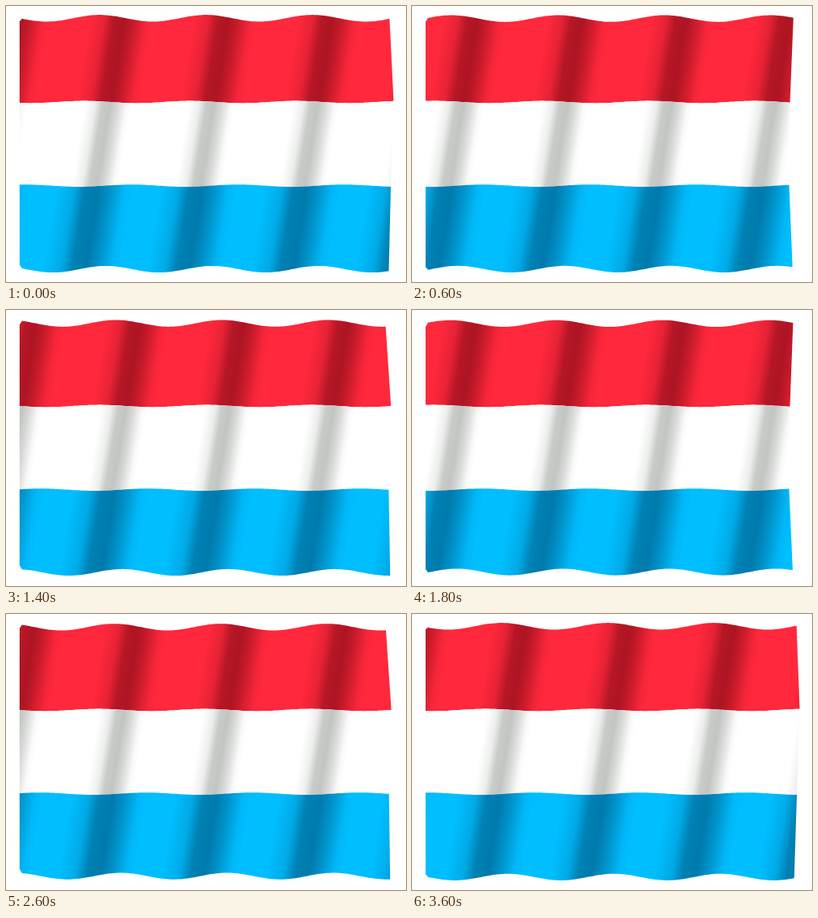
An HTML page with a canvas that plays this animation: 500x345 px, repeating every 3700 ms.

```html
<!DOCTYPE html>
<html lang="en">
<head>
<meta charset="utf-8">
<title>Waving flag</title>
<style>
html, body { margin: 0; width: 100%; height: 100%; overflow: hidden; background: #fff; }
canvas { display: block; }
</style>
</head>
<body>
<canvas id="flag" width="500" height="345"></canvas>
<script>
const ctx = document.getElementById('flag').getContext('2d');
const LOOP = 3700, STEP = 100, TURN = 2 * Math.PI;
const PHASE_STEP = 2.96 / 36;
const LEFT = 17, WAVE = 133, FOLD = 130, SLANT = 0.16;

// Horizontal seams: mean height, amplitude, crest position, and the
// right end as mean + a cos + b sin of the phase.
const seams = [
  { y: 15.3, amp: 4.2, crest: 250, end: [478.2, 1.2, -5.3] },
  { y: 120, amp: 1.4, crest: 230, end: [478.5, 6, -1] },
  { y: 224.6, amp: 1.4, crest: 290, end: [476.2, 4.8, -0.8] },
  { y: 329, amp: 4.1, crest: 258, end: [477, 1.5, 2.9] }
];

const stripes = [
  { light: [255, 40, 60], dark: [174, 21, 35], reach: 39 },
  { light: [254, 255, 254], dark: [194, 197, 194], reach: 29 },
  { light: [0, 190, 255], dark: [0, 122, 172], reach: 47 }
];

// Shadow depth across one fold, from its left rim to its right rim.
const profile = [[-1, 0], [-0.55, 0.3], [-0.25, 0.9], [0.1, 1], [0.4, 0.68], [0.8, 0.1], [1, 0]];

const mix = (a, b, k) => `rgb(${a.map((v, i) => Math.round(v + (b[i] - v) * k))})`;

function seamY(seam, x, phase, shift) {
  return seam.y + shift - seam.amp * Math.cos(TURN * ((x - seam.crest) / WAVE - phase));
}

function endX([mean, a, b], phase) {
  return mean + a * Math.cos(TURN * phase) + b * Math.sin(TURN * phase);
}

function seamPoints(seam, phase, shift) {
  const end = endX(seam.end, phase), points = [];
  for (let x = LEFT; x < end; x += 3) points.push([x, seamY(seam, x, phase, shift)]);
  points.push([end, seamY(seam, end, phase, shift)]);
  return points;
}

function shading({ light, dark, reach }, phase) {
  const start = -300, span = 1200;
  const g = ctx.createLinearGradient(start, 0, start + span, 0);
  for (let k = -3; k < 4; k++) {
    const center = 250 + (k + phase % 1) * FOLD;
    for (const [u, depth] of profile) {
      g.addColorStop((center + u * reach - start) / span, mix(light, dark, depth));
    }
  }
  return g;
}

function draw(time) {
  const t = Math.floor((time % LOOP) / STEP) * STEP;
  const phase = t / STEP * PHASE_STEP;
  const pinch = ms => 0.8 * (1 - Math.cos(TURN * ms / LOOP));
  const shifts = [pinch(t), 0, 0, -pinch(Math.max(0, t - 300))];
  const lines = seams.map((s, i) => seamPoints(s, phase, shifts[i]));

  // The two left corners are bevelled while the cloth swings away.
  const bevel = Math.min(5, 4 + 4 * Math.cos(TURN * (phase - 0.25)));
  lines[0][0][1] += bevel;
  lines[3][0][1] -= bevel;

  ctx.fillStyle = '#fff';
  ctx.fillRect(0, 0, 500, 345);
  stripes.forEach((stripe, i) => {
    ctx.beginPath();
    for (const p of lines[i]) ctx.lineTo(...p);
    for (const p of lines[i + 1].slice().reverse()) ctx.lineTo(...p);
    ctx.closePath();
    ctx.save();
    ctx.transform(1, 0, -SLANT, 1, SLANT * 170, 0);
    ctx.fillStyle = shading(stripe, phase);
    ctx.fill();
    ctx.restore();
  });
}

const began = performance.now();
function tick() {
  draw(performance.now() - began);
  requestAnimationFrame(tick);
}
tick();
</script>
</body>
</html>
```
